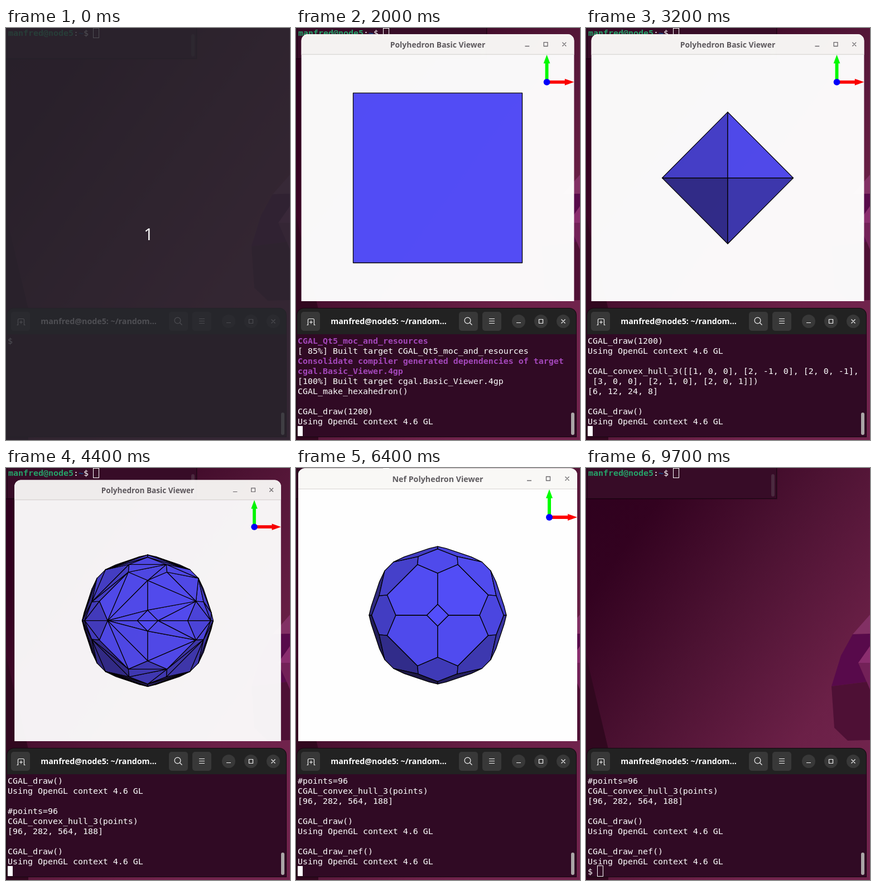
An HTML page for the animation above (9800 ms loop, 509 px wide and 736 px high).

```html
<!DOCTYPE html>
<html lang="en">
<head>
<meta charset="utf-8">
<title>Polyhedron viewers</title>
<style>
  html, body { margin: 0; width: 100%; height: 100%; overflow: hidden; background: #2c0a20; }
  svg { display: block; width: 509px; height: 736px; }
  text { white-space: pre; }
  .mono { font: 14.95px "DejaVu Sans Mono", "Noto Sans Mono", monospace; fill: #fff; }
  .bold { font-weight: 700; }
  .title { font: 700 14.25px "Open Sans", "Noto Sans", sans-serif; text-anchor: middle; }
  .icon { fill: none; stroke: #f2f2f2; stroke-width: 1.2; }
  .grey { fill: none; stroke: #6a686b; stroke-width: 1.3; }
</style>
</head>
<body>
<svg viewBox="0 0 509 736">
  <defs>
    <linearGradient id="sky" gradientUnits="userSpaceOnUse" x1="0" y1="0" x2="560" y2="406">
      <stop offset="0" stop-color="#2d001d"/>
      <stop offset=".2" stop-color="#330220"/>
      <stop offset=".5" stop-color="#4c1232"/>
      <stop offset=".86" stop-color="#6b2047"/>
      <stop offset="1" stop-color="#70234c"/>
    </linearGradient>
  </defs>

  <rect width="509" height="736" fill="url(#sky)"/>
  <path d="M0 335L40 502V736H0z" fill="#31081f"/>
  <path d="M509 262L478 297L509 296z" fill="#823064"/>
  <path d="M478 297L509 296V320L488 348L503 382L440 390L457 335z" fill="#580a4b"/>
  <path d="M509 318L488 348H509z" fill="#8a2d6e"/>
  <path d="M488 348H509V396L503 382z" fill="#732158"/>
  <path d="M440 390L503 382L509 396V486L469 487L445 464z" fill="#4e1035"/>

  <rect y="-2" width="343" height="58" fill="#000" opacity=".25"/>
  <rect width="341" height="54" fill="#370c27"/>
  <path d="M2.5 0V54M0 54.5H342M341.5 0V54" stroke="#1c0614"/>
  <rect x="332" y="11" width="6" height="40" rx="3" fill="#4b2a3f"/>
  <text class="mono" x="4" y="14"><tspan class="bold" fill="#26a269">manfred@node5</tspan>:<tspan class="bold" fill="#12488b">~</tspan>$</text>
  <rect x="156.5" y=".5" width="10" height="17" fill="none" stroke="#fff"/>

  <path d="M1 731V513a13 13 0 0 1 13-13h476a13 13 0 0 1 13 13V731z" fill="#150810"/>
  <path d="M2 547V513a12 12 0 0 1 12-12h476a12 12 0 0 1 12 12v34z" fill="#222"/>
  <rect x="2" y="547" width="500" height="183" fill="#300a24"/>
  <g fill="#383838">
    <rect x="9" y="507" width="34" height="34" rx="5"/>
    <rect x="292" y="507" width="34" height="34" rx="5"/>
    <rect x="334" y="507" width="34" height="34" rx="5"/>
    <circle cx="399" cy="524" r="12"/><circle cx="439" cy="524" r="12"/><circle cx="479" cy="524" r="12"/>
  </g>
  <path class="icon" d="M19.5 530.5h2v-9q0-2 2-2h7q2 0 2 2v9h2M24 525.5h6M27 522.5v6
    M311.500 526.500L315.500 530.500M346 519.500h10M346 523.500h10M346 527.500h10
    M395 526.500h8M435.500 520.500h7v7h-7zM475.500 520.500l7 7M482.500 520.500l-7 7"/>
  <circle class="icon" cx="307.5" cy="522.5" r="5.4"/>
  <text class="title" x="166" y="529" fill="#fff">manfred@node5: ~/random...</text>
  <rect x="493" y="687" width="6" height="40" rx="3" fill="#aaa5a6"/>
  <g id="rows"></g>
  <rect id="cursor"/>

  <g id="viewer">
    <path d="M4 488V12.500a12 12 0 0 1 12-12h476a12 12 0 0 1 12 12V488z" fill="#fefefe"/>
    <path d="M4 38V12.500a12 12 0 0 1 12-12h476a12 12 0 0 1 12 12V38z" fill="#f9f8f6"/>
    <path d="M4 37.500H504" stroke="#d8d5d2"/>
    <text id="caption" class="title" x="254" y="25" fill="#5f5c60"></text>
    <path class="grey" d="M414 22.500h8M448.500 15.500h7v7h-7zM482.500 15.500l7 7M489.500 15.500l-7 7"/>
    <g id="solids" stroke="#000" stroke-width="1.3" stroke-linejoin="round"></g>
    <path d="M451 88V54h-3L454 38L460 54h-3V88z" fill="#0f0"/>
    <path d="M454 85H487V82L504 88L487 94V91H454z" fill="#f00"/>
    <circle cx="454" cy="88" r="6" fill="#00f"/>
  </g>

  <g id="count">
    <rect width="509" height="736" fill="#28282e" opacity=".82"/>
    <text x="255.5" y="379" text-anchor="middle" fill="#fff" style="font:30px 'Open Sans','Noto Sans',sans-serif">1</text>
  </g>
</svg>

<script>
const LOOP = 9800, STEP = 100;
const $ = id => document.getElementById(id);
const add = (parent, tag, attrs) => {
  const el = document.createElementNS("http://www.w3.org/2000/svg", tag);
  set(el, attrs);
  return parent.appendChild(el);
};
const set = (el, attrs) => { for (const k in attrs) el.setAttribute(k, attrs[k]); };

// ---- solids ----
const EYE = 34.05, FOCAL = 508;
const dot = (a, b) => a[0] * b[0] + a[1] * b[1] + a[2] * b[2];
const sub = (a, b) => a.map((v, i) => v - b[i]);
const cross = (a, b) => [a[1] * b[2] - a[2] * b[1], a[2] * b[0] - a[0] * b[2], a[0] * b[1] - a[1] * b[0]];
const project = ([x, y, z]) => {
  const s = FOCAL / (EYE - z);
  return [254 + x * s, 263 - y * s];
};

// integer points of a cube of side 2r that pass the test
function lattice(r, test) {
  const out = [];
  for (let x = -r; x <= r; x++)
    for (let y = -r; y <= r; y++)
      for (let z = -r; z <= r; z++)
        if (test(x, y, z)) out.push([x, y, z]);
  return out;
}

const scaled = (pts, k) => pts.map(p => p.map(v => v * k));

function plane(a, b, c, pts) {
  let n = cross(sub(b, a), sub(c, a));
  const len = Math.hypot(...n);
  if (len < 1e-9) return null;
  n = n.map(v => v / len);
  let d = dot(n, a);
  if (d < 0) { n = n.map(v => -v); d = -d; }
  if (n[2] * EYE <= d) return null;
  for (const p of pts) if (dot(n, p) > d + 1e-6) return null;
  return { n, d };
}

// faces of the convex hull that look at the eye
function hull(pts) {
  const faces = new Map(), m = pts.length;
  for (let i = 0; i < m; i++)
    for (let j = i + 1; j < m; j++)
      for (let k = j + 1; k < m; k++) {
        const f = plane(pts[i], pts[j], pts[k], pts);
        if (!f) continue;
        const key = f.n.map(v => Math.round(v * 1e4)).join();
        if (faces.has(key)) continue;
        f.pts = ring(pts.filter(p => Math.abs(dot(f.n, p) - f.d) < 1e-6));
        faces.set(key, f);
      }
  return [...faces.values()];
}

function ring(pts) {
  const flat = pts.map(p => ({ p, q: project(p) }));
  const mid = i => flat.reduce((s, f) => s + f.q[i], 0) / flat.length;
  const cx = mid(0), cy = mid(1);
  const angle = f => Math.atan2(f.q[1] - cy, f.q[0] - cx);
  return flat.sort((a, b) => angle(a) - angle(b)).map(f => f.p);
}

function shade([x, y, z]) {
  const side = Math.max(0, Math.min(1.2, 2.35 - 2.4 * z));
  const b = Math.max(70, Math.min(250, 96 + 160 * z + side * (33 * x + 57 * y)));
  return `rgb(${Math.round(b * .3 + 8)},${Math.round(b * .3 + 3)},${Math.round(b)})`;
}

function fan(pts) {
  const score = ([x, y]) => Math.abs(x) - (x < 0 ? .6 * Math.abs(y) : 0) + .01 * y;
  const s = pts.reduce((best, p, i) => score(p) > score(pts[best]) ? i : best, 0);
  const r = [...pts.slice(s), ...pts.slice(0, s)];
  return r.slice(2).map((p, i) => [r[0], r[i + 1], p]);
}

function solid(faces, split) {
  const g = add($("solids"), "g", {});
  for (const f of faces)
    for (const poly of split ? fan(f.pts) : [f.pts])
      add(g, "polygon", { points: poly.map(p => project(p).map(v => v.toFixed(2))).join(" "), fill: shade(f.n) });
  return g;
}

const ball = hull(lattice(8, (x, y, z) => x * x + y * y + z * z === 65));
const cube = hull(scaled(lattice(1, (x, y, z) => x * y * z), 7.96));
const octa = hull(scaled(lattice(1, (x, y, z) => x * x + y * y + z * z === 1), 8.06));

const BASIC = "Polyhedron Basic Viewer";
const views = [
  { open: 1918, close: 2966, name: BASIC, el: solid(cube) },
  { open: 3118, close: 4166, name: BASIC, el: solid(octa) },
  { open: 4333, close: 5366, name: BASIC, el: solid(ball, true) },
  { open: 5525, close: 7866, name: "Nef Polyhedron Viewer", el: solid(ball) }
];

// ---- terminal ----
const COMMAND = "./run_4gp.sh", GL = "Using OpenGL context 4.6 GL";
const NEEDS = "!Consolidate compiler generated dependencies of target"; // "!" marks bold purple
const log = [
  [1600, NEEDS, "!CGAL_Qt5_moc_and_resources", "[ 85%] Built target CGAL_Qt5_moc_and_resources"],
  [1700, NEEDS, "!cgal.Basic_Viewer.4gp", "[100%] Built target cgal.Basic_Viewer.4gp"],
  [1800, "CGAL_make_hexahedron()", "", "CGAL_draw(1200)", GL],
  [3000, "", "CGAL_convex_hull_3([[1, 0, 0], [2, -1, 0], [2, 0, -1],",
    " [3, 0, 0], [2, 1, 0], [2, 0, 1]])", "[6, 12, 24, 8]", "", "CGAL_draw()"],
  [3100, GL],
  [4200, "", "#points=96", "CGAL_convex_hull_3(points)", "[96, 282, 564, 188]", "", "CGAL_draw()"],
  [4300, GL],
  [5400, "", "CGAL_draw_nef()"],
  [5500, GL]
];
const rows = Array.from({ length: 10 }, (_, i) =>
  add($("rows"), "text", { x: 3, y: 564 + 18 * i }));

function drawTerminal(t) {
  let lines = ["$ " + (t >= 700 ? COMMAND : "")];
  for (const [at, ...text] of log) if (t >= at) lines.push(...text);
  if (t >= 1600) lines.push(t >= 7900 ? "$ " : "");
  lines = lines.slice(-10);
  rows.forEach((row, i) => {
    const s = lines[i] || "", strong = s[0] === "!";
    row.textContent = strong ? s.slice(1) : s;
    row.setAttribute("class", strong ? "mono bold" : "mono");
    row.style.fill = strong ? "#a347ba" : "#fff";
  });
  const last = lines.length - 1;
  drawCursor(t, 3 + 9 * lines[last].length, 549 + 18 * last);
}

function drawCursor(t, x, y) {
  const hollow = t >= 9700;
  const lit = t < 1600 ? t >= 400 && t < 1200 : Math.floor((t - 1600) / 600) % 2 === 0;
  set($("cursor"), hollow
    ? { x: x - .5, y: y - .5, width: 10, height: 19, fill: "none", stroke: "#fff", opacity: 1 }
    : { x, y, width: 9, height: 18, fill: "#fff", stroke: "none", opacity: lit ? 1 : 0 });
}

// ---- viewer window ----
const clamp = v => Math.max(0, Math.min(1, v));

function drawViewer(t) {
  const view = views.find(v => t >= v.open && t < v.close + 150);
  $("viewer").style.display = view ? "" : "none";
  if (!view) return;
  for (const v of views) v.el.style.display = v === view ? "" : "none";
  $("caption").textContent = view.name;
  let sx = 1, sy = 1, pivot = 488, opacity = 1;
  if (t >= view.close) {
    const k = 1 - clamp((t - view.close) / 150);
    opacity = k * k;
    sx = sy = .8 + .2 * opacity;
    pivot = 244.5;
  } else if (t < view.open + 150) {
    opacity = 1 - 2 ** (-10 * (t - view.open) / 150);
    sx = .01 + .99 * opacity;
    sy = .05 + .95 * opacity;
  }
  set($("viewer"), {
    transform: `translate(254 ${pivot}) scale(${sx} ${sy}) translate(-254 ${-pivot})`,
    opacity
  });
}

// ---- clock ----
const start = performance.now();
let shown = -1;
function tick() {
  const t = Math.floor((performance.now() - start) % LOOP / STEP) * STEP;
  if (t !== shown) {
    shown = t;
    $("count").style.display = t < 100 ? "" : "none";
    drawTerminal(t);
    drawViewer(t);
  }
  requestAnimationFrame(tick);
}
tick();
</script>
</body>
</html>
```
